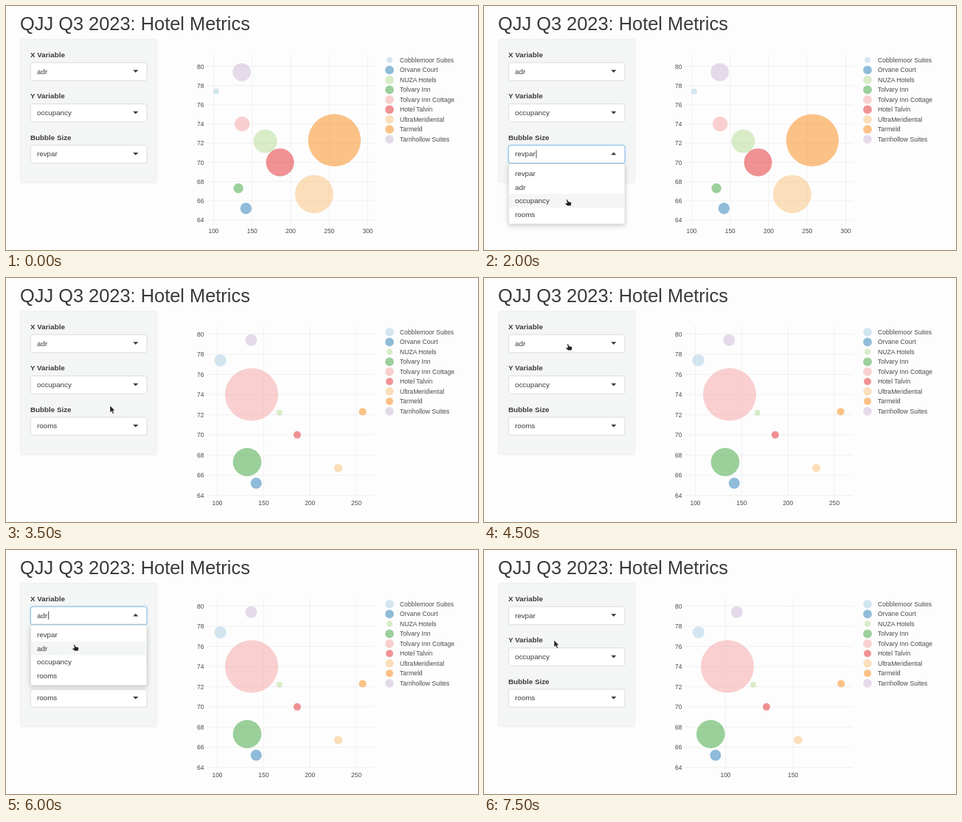
An HTML page for the animation above (8 s loop, 640 by 333 pixels).

```html
<!DOCTYPE html>
<html lang="en">
<head>
<meta charset="utf-8">
<title>Hotel Metrics</title>
<style>
  html, body { margin: 0; height: 100%; overflow: hidden; background: #fdfdfd; }
  svg { display: block; width: 100%; height: 100%; font: 9.8px "Liberation Sans", Arial, sans-serif; fill: #3a3a3a; }
  .title { font-size: 25.4px; }
  .label { font-weight: bold; }
  .chart { font-size: 8.45px; fill: #4a4a4a; }
  .legend { font-size: 8.6px; }
  .grid { stroke: #f0f0f0; stroke-width: .9; }
  .panel { fill: #f4f6f5; stroke: #eaeceb; stroke-width: .7; }
  .field { fill: #fff; stroke: #d0d0d0; stroke-width: .7; }
  .focus { stroke: #76b5e6; stroke-width: .9; filter: drop-shadow(0 0 1.5px #66afe966); }
  .menu { fill: #fff; stroke: #d4d4d4; stroke-width: .7; filter: drop-shadow(0 2px 3px #0003); }
</style>
</head>
<body>
<svg id="stage" viewBox="0 0 640 333"></svg>
<script>
const stage = document.getElementById('stage');
const STEP = 500;
const OPTIONS = ['revpar', 'adr', 'occupancy', 'rooms'];
const LABELS = ['X Variable', 'Y Variable', 'Bubble Size'];

// name, colour, adr, occupancy, radius by revpar, radius by rooms
const HOTELS = [
  ['Cobblemoor Suites', '#a9cfe3', 103.3, 77.4, 4, 8.2],
  ['Orvane Court', '#2479b6', 142, 65.2, 7.7, 7.5],
  ['NUZA Hotels', '#b4dc94', 167, 72.2, 16, 4],
  ['Tolvary Inn', '#3aa43a', 132.2, 67.3, 6.7, 19.3],
  ['Tolvary Inn Cottage', '#f6a2a2', 137, 74, 10.2, 36],
  ['Hotel Talvin', '#e3262b', 186.2, 70, 19, 5],
  ['UltraMeridiental', '#fac078', 230.5, 66.7, 26, 5.7],
  ['Tarmeld', '#fa8712', 256.8, 72.3, 35.7, 5.1],
  ['Tarnhollow Suites', '#cbb7d8', 136.5, 79.4, 12.3, 8]
];

// x0: position of 100 on the x axis; y0: position of 80 on the y axis
const CHARTS = [
  { x: 'adr', size: 'revpar', x0: 281.5, kx: 1.045, y0: 82.4, ky: 13.1, max: 300 },
  { x: 'adr', size: 'rooms', x0: 286.5, kx: 1.257, y0: 76.6, ky: 13.75, max: 250 },
  { x: 'revpar', size: 'rooms', x0: 327.5, kx: 1.83, y0: 76.6, ky: 13.75, max: 150 }
];

// chart, x choice, size choice, cursor [kind, x, y], open menu, highlighted option
const STEPS = [
  [0, 1, 0],
  [0, 1, 0, ['arrow', 150, 182]],
  [0, 1, 0, ['hand', 118, 200]],
  [0, 1, 0, ['beam', 116, 207], 2, 0],
  [0, 1, 0, ['hand', 112, 264], 2, 2],
  [0, 1, 0, ['hand', 107, 281], 2, 3],
  [0, 1, 3, ['arrow', 105, 282]],
  [1, 1, 3, ['arrow', 141, 174]],
  [1, 1, 3, ['arrow', 136, 118]],
  [1, 1, 3, ['hand', 113, 90]],
  [1, 1, 3, ['beam', 113.5, 95.5], 0, 1],
  [1, 1, 3, ['hand', 98, 148], 0, 2],
  [1, 1, 3, ['hand', 92, 129], 0, 1],
  [1, 1, 3, ['hand', 89, 114], 0, 0],
  [1, 0, 3, ['arrow', 91, 115]],
  [2, 0, 3, ['arrow', 95, 123]]
];

const CURSORS = {
  arrow: '<path d="M0 0V9.6L2.2 7.7L3.8 11.2L5.5 10.5L3.9 7H6.7Z" fill="#222" stroke="#fff" stroke-width=".5"/>',
  hand: '<path d="M-.3.6Q.6-.5 1.5.8L2.4 3L5.6 3.8Q6.8 4.3 6.4 6L5.6 8.8H1.4L-2 6.2Q-2.2 4.8.8 5Z" fill="#222" stroke="#fff" stroke-width=".4"/>',
  beam: '<path d="M-2-4Q0-4 0-3Q0-4 2-4M0-3V3.5M-2 4.5Q0 4.5 0 3.5Q0 4.5 2 4.5M-1.2 2H1.2" fill="none" stroke="#222"/>'
};

const text = (x, y, s, attrs = '') => `<text x="${x}" y="${y}" ${attrs}>${s}</text>`;
const box = (x, y, w, h, attrs = '') => `<rect x="${x}" y="${y}" width="${w}" height="${h}" ${attrs}/>`;
const dot = (x, y, r, color) => `<circle cx="${x}" cy="${y}" r="${r}" fill="${color}" opacity=".5"/>`;
const line = d => `<path class="grid" d="${d}"/>`;
const fieldY = i => 89.3 + 56.4 * i;

function drawChart({ x, size, x0, kx, y0, ky, max }) {
  const px = v => x0 + (v - 100) * kx;
  const py = v => y0 + (80 - v) * ky;
  const radius = h => size === 'revpar' ? h[4] : h[5];
  let out = '';
  for (let v = 100; v <= max; v += 50)
    out += line(`M${px(v)} 65V299`) + text(px(v), 309.6, v, 'text-anchor="middle"');
  for (let v = 64; v <= 80; v += 2)
    out += line(`M272 ${py(v)}H500`) + text(268.5, py(v) + 3.1, v, 'text-anchor="end"');
  for (const h of HOTELS)
    out += dot(px(x === 'adr' ? h[2] : h[2] * h[3] / 100), py(h[3]), radius(h), h[1]);
  HOTELS.forEach((h, i) => {
    const y = 73.8 + 13.5 * i;
    out += dot(520, y, Math.min(radius(h), 5.9), h[1]) + text(534, y + 3, h[0], 'class="legend"');
  });
  return `<g class="chart">${out}</g>`;
}

function drawField(i, choice, open) {
  const y = fieldY(i);
  const arrow = open ? `M172.3 ${y + 1.2}h7l-3.5-3.7z` : `M172.3 ${y - 2}h7l-3.5 3.7z`;
  const caret = open ? box([70.5, 57.3][choice], y - 5.5, .9, 11) : '';
  return text(33, y - 19.3, LABELS[i], 'class="label"') +
    box(33.3, y - 12, 157.7, 24.5, `rx="2.8" class="field ${open ? 'focus' : ''}"`) +
    text(42, y + 3.2, OPTIONS[choice]) + caret + `<path d="${arrow}"/>`;
}

function drawMenu(i, active) {
  const top = fieldY(i) + 13.2;
  return box(33.3, top, 157.7, 82.3, 'rx="2" class="menu"') +
    OPTIONS.map((name, k) => {
      const y = top + 4 + 18.6 * k;
      return (k === active ? box(33.7, y, 157, 18.6, 'fill="#f4f5f5"') : '') + text(42, y + 12.6, name);
    }).join('');
}

function draw([chart, xChoice, sizeChoice, cursor, open = -1, active]) {
  const choices = [xChoice, 2, sizeChoice];
  let out = text(19, 33, 'QJJ Q3 2023: Hotel Metrics', 'class="title"') +
    box(19.3, 45.3, 185.5, 196, 'rx="2.8" class="panel"') +
    choices.map((c, i) => drawField(i, c, i === open)).join('') +
    drawChart(CHARTS[chart]);
  if (open >= 0) out += drawMenu(open, active);
  if (cursor) out += `<g transform="translate(${cursor[1]} ${cursor[2]})">${CURSORS[cursor[0]]}</g>`;
  stage.innerHTML = out;
}

let shown = -1;
function tick() {
  const step = Math.floor(performance.now() / STEP) % STEPS.length;
  if (step !== shown) draw(STEPS[shown = step]);
  requestAnimationFrame(tick);
}
tick();
</script>
</body>
</html>
```
